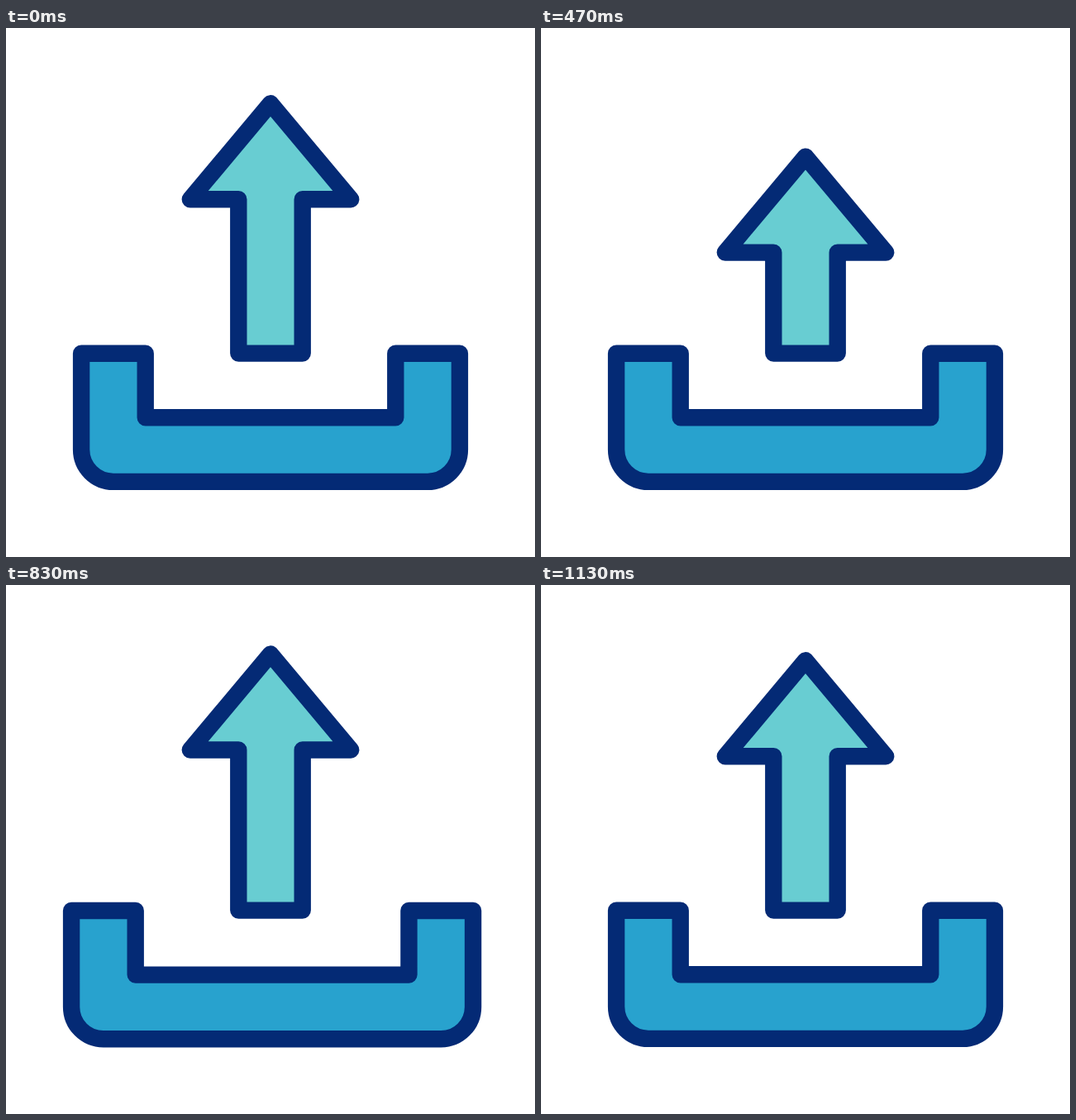
An HTML page for the animation above (1.5 s loop, 640x640 px).

```html
<!DOCTYPE html>
<html lang="en">
<head>
<meta charset="utf-8">
<title>Upload icon</title>
<style>
  html, body { margin: 0; height: 100%; overflow: hidden; background: #fff; }
  svg { display: block; width: 100vw; height: 100vh; }
  path { stroke: #042a75; stroke-width: 20.4; stroke-linejoin: round; }
</style>
</head>
<body>
<svg viewBox="0 0 640 640">
  <path id="tray" fill="#28a2ce"/>
  <path id="arrow" fill="#68cdd2"/>
</svg>
<script>
const LOOP = 1500, FPS = 30;
const tray = document.getElementById('tray');
const arrow = document.getElementById('arrow');

// Keys are [frame, value], eased in and out between neighbours
const headKeys = [[0, 0], [11, 95.5], [21, -49], [29, 33.5], [34, 0]];
const stretchKeys = [[14, 0], [21, 1], [28, 0]];

function valueAt(keys, frame) {
  const next = keys.findIndex(key => key[0] > frame);
  if (next === 0) return keys[0][1];
  if (next < 0) return keys[keys.length - 1][1];
  const [t0, v0] = keys[next - 1], [t1, v1] = keys[next];
  const x = (frame - t0) / (t1 - t0);
  return v0 + (v1 - v0) * x * x * (3 - 2 * x);
}

function draw() {
  // Steps at 30 fps, on a clock rounded to 10 ms
  const frame = Math.floor((performance.now() % LOOP + 4) * FPS / 1000);

  const head = valueAt(headKeys, frame);
  const neck = 207.3 + head;
  arrow.setAttribute('d', `M320 ${91.3 + head}L417.2 ${neck}H358.7V393.6H281.3V${neck}H222.8Z`);

  const stretch = valueAt(stretchKeys, frame);
  const left = 91.1 - 30.5 * stretch, right = 548.9 + 41 * stretch;
  const top = 393.7 + 0.8 * stretch;
  tray.setAttribute('d', `M${left} ${top}h77.6v77.6H${right - 77.6}v-77.6H${right}v116.4
    a38.8 38.8 0 0 1-38.8 38.8H${left + 38.8}a38.8 38.8 0 0 1-38.8-38.8Z`);

  requestAnimationFrame(draw);
}
draw();
</script>
</body>
</html>
```
